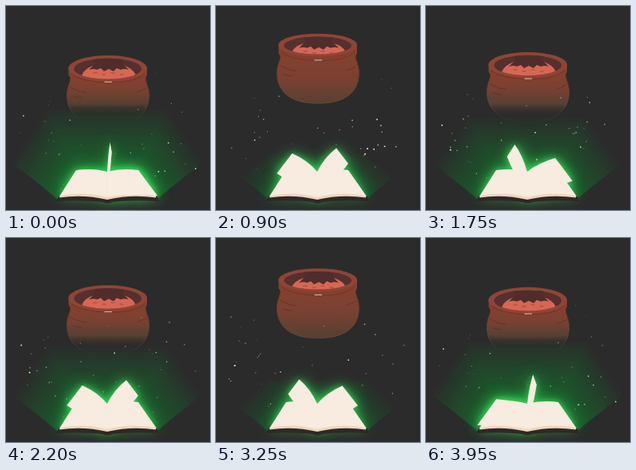
These frames come from a looping animation (256x256 px, 4 s). An HTML page with a canvas:

```html
<!DOCTYPE html>
<html lang="en">
<head>
<meta charset="utf-8">
<title>Cauldron and spell book</title>
<style>
html, body { margin: 0; width: 100%; height: 100%; overflow: hidden; background: #2b2b2b; }
canvas { display: block; width: 256px; height: 256px; }
</style>
</head>
<body>
<canvas id="stage" width="256" height="256"></canvas>
<script>
const ctx = document.getElementById('stage').getContext('2d');
const LOOP = 4000, STEP = 1000 / 12, MID = 127;
const TAU = Math.PI * 2;

let seed = 11;
const rand = () => (seed = seed * 16807 % 2147483647) / 2147483647;

// Most sparks rise beside the book, a few above it
const sparks = Array.from({ length: 64 }, () => {
  const out = 112 * Math.pow(rand(), .6);
  return {
    x: MID + (rand() < .5 ? -out : out),
    y: 172 + rand() * 52,
    birth: rand(),
    life: .3 + rand() * .4,
    size: 1 + rand() * rand()
  };
});

function shape(d, fill, stroke, width = 1) {
  const p = new Path2D(d);
  if (fill) { ctx.fillStyle = fill; ctx.fill(p); }
  if (stroke) { ctx.strokeStyle = stroke; ctx.lineWidth = width; ctx.stroke(p); }
}

function oval(x, y, rx, ry, fill) {
  ctx.beginPath();
  ctx.ellipse(x, y, rx, ry, 0, 0, TAU);
  ctx.fillStyle = fill;
  ctx.fill();
}

function fade(y0, y1, stops) {
  const g = ctx.createLinearGradient(0, y0, 0, y1);
  stops.forEach(([at, color]) => g.addColorStop(at, color));
  return g;
}

function drawPot(low) {
  const top = 48 + 14 * low, end = 143 - 7 * low - top;
  ctx.save();
  ctx.translate(0, top);
  // The lower part sinks into the darkness above the book
  const body = fade(28, end, [[0, '#85412f'], [.35, '#784132'], [.7, '#574033'], [1, 'rgba(50,46,40,0)']]);
  const edge = fade(28, end + 10, [[0, '#6a3226'], [.6, '#63493a'], [1, 'rgba(70,62,48,0)']]);
  shape('M80 25C83 32 76.5 37 76.5 50C77 72 92 87.5 128 87.5C164 87.5 179 72 179.5 50C179.5 37 173 32 176 25Z', body, edge);
  shape('M80 40Q91 46 101 47M84 51Q91 53 95 53M176 41Q169 45 164 46', null, 'rgba(80,38,30,.5)');

  const ry = 15.3 + low, inner = ry - 3.3;
  shape('M78.5 15V24C80 33 103 36 128 36S175 33 177 24V15Z', '#84402f');
  oval(127.7, ry, 49.3, ry, '#8f4535');
  oval(127.7, ry + .5, 42.5, inner, '#55302f');
  ctx.save();
  ctx.clip();
  oval(129, ry + 11, 34, ry + 1.5, '#d76755');
  shape('M108 0L112 10L104 18Q110 16 114 18L119 16L123 20L129 17L135 20L139 16L144 18Q148 16 154 18L146 10L150 0Z', '#4f2d2d');
  for (let i = 0; i < 4; i++) oval(112 + 11 * i, 22 + i % 2 * 2, 3, 1, '#bd5445');
  ctx.restore();
  shape('M82 23Q94 33 128 34T174 23', null, '#6b3327', .8);
  shape('M123.5 33.3H133', null, '#d3b096', 1.2);
  ctx.restore();
}

// Stacked fans that widen from the book
function drawGlow(power) {
  const layers = 18;
  ctx.fillStyle = `rgba(26,${100 + 20 * power},46,${.05 + .015 * power})`;
  for (let i = 1; i <= layers; i++) {
    const d = Math.pow(i / layers, 1.5) * (34 + 24 * power);
    const rise = d * (.65 + .65 * power);
    const left = [[66, 244], [66 - d, 241 - d * .75], [88 - d * .6, 206 - rise]];
    const right = left.map(([x, y]) => [2 * MID - x, y]).reverse();
    ctx.beginPath();
    left.concat(right).forEach(p => ctx.lineTo(...p));
    ctx.fill();
  }
}

const BOOK = 'M88 206Q110 203 127 208Q145 203 166 206L189 239Q157 233 127 242Q97 233 67 239Z';

// A leaf swings over the spine in half a turn
function leaf(step) {
  const flat = Math.PI * step / 32;
  const angle = flat - .09 * Math.sin(flat);
  const reach = Math.cos(angle), lift = Math.sin(angle);
  const x = MID + 39 * reach, y = 206 - 35 * lift;
  const cx = MID + 63 * reach, cy = 238 - 55 * Math.pow(lift, 1.3);
  return `M127 208Q${MID + 14 * reach} ${208 + .6 * (y - 208)} ${x} ${y}` +
    `L${cx} ${cy}Q${MID + 43 * reach} ${(232 + cy) / 2} 127 239Z`;
}

function drawBook(step, power) {
  const pages = [leaf(step + 16), leaf(step)];
  ctx.save();
  ctx.shadowColor = `rgba(60,215,90,${.7 + .15 * power})`;
  for (const blur of [20, 9]) {
    ctx.shadowBlur = blur;
    [BOOK, ...pages].forEach(d => shape(d, '#3abd58'));
  }
  ctx.restore();
  shape('M66 239Q97 235 127 242Q158 235 190 239L192 245Q158 243 134 246Q127 249 121 246Q97 243 63 245Z', '#2d2926');
  shape(BOOK, '#f8ebdf');
  shape('M68 238Q98 232 127 240Q156 232 188 238V240.5Q157 236 127 243Q97 236 67 240.5Z', '#f0d6bd');
  shape('M127 209V240', null, '#e9dac9', .8);
  pages.forEach(d => shape(d, '#f8ebdf'));
}

function drawSparks(t, power) {
  const tint = Math.round(255 - 110 * power);
  ctx.fillStyle = `rgb(${tint},250,${tint})`;
  for (const s of sparks) {
    const age = (t / LOOP + s.birth) % 1, a = age / s.life;
    if (a >= 1) continue;
    ctx.globalAlpha = Math.min(1, a * 6, (1 - a) * 3) * s.size / 2 + .1;
    ctx.fillRect(s.x + Math.sin(a * TAU), s.y - 80 * age * (1 + s.life), s.size, s.size);
  }
  ctx.globalAlpha = 1;
}

function draw(t) {
  const low = Math.cos(t * TAU / 2000), power = (1 + low) / 2;
  const step = Math.floor(t / STEP + .001) % 16;
  ctx.fillStyle = '#2b2b2b';
  ctx.fillRect(0, 0, 256, 256);
  drawPot(low);
  drawGlow(power);
  drawSparks(t, power);
  drawBook(step, power);
}

const begin = performance.now();
function tick() {
  draw((performance.now() - begin) % LOOP);
  requestAnimationFrame(tick);
}
tick();
</script>
</body>
</html>
```
